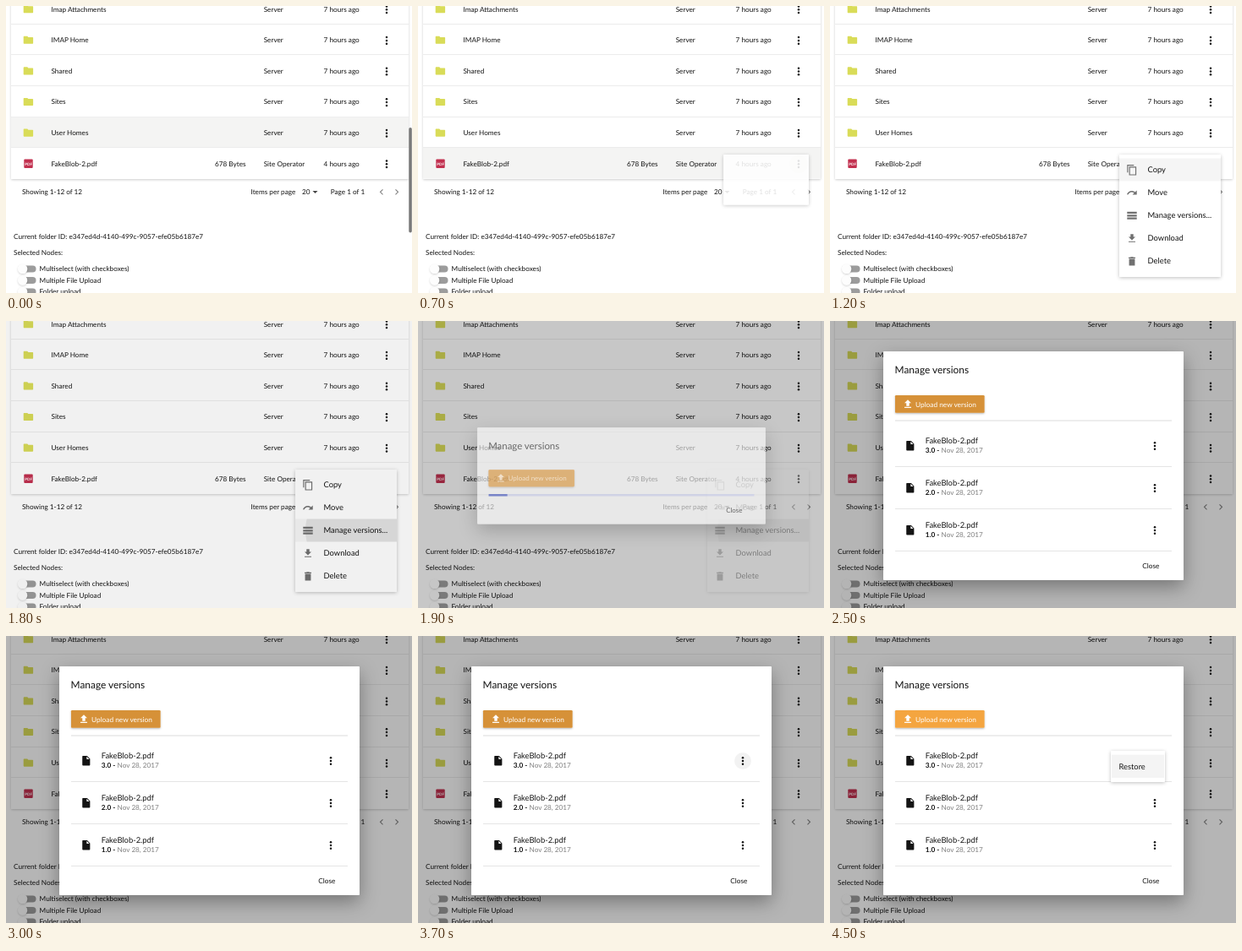
Recreate the animation shown at these times as an HTML page with a canvas. Size 480 by 340 pixels, loop 4.8 s.

```html
<!DOCTYPE html>
<html lang="en">
<head>
<meta charset="utf-8">
<title>Manage versions</title>
<style>
  html, body { margin: 0; width: 100%; height: 100%; overflow: hidden; background: #fff; }
  canvas { display: block; width: 480px; height: 340px; }
</style>
</head>
<body>
<canvas id="stage"></canvas>
<script>
const W = 480, H = 340, LOOP = 4800, STEP = 100;
const canvas = document.getElementById('stage');
const ratio = window.devicePixelRatio || 1;
canvas.width = W * ratio;
canvas.height = H * ratio;
const ctx = canvas.getContext('2d');

// Icons on a 24 x 24 grid, filled with the even-odd rule
const ICONS = {
  folder: 'M10 4H3L2 5V19L3 20H21L22 19V7L21 6H12Z',
  file: 'M5 2L4 3V21L5 22H19L20 21V8L14 2ZM13 3.5V9H18.5Z',
  copy: 'M16 1H2V17H4V3H16ZM6 5H21V23H6ZM8 7V21H19V7Z',
  move: 'M18.4 10.6C16.5 9 14.2 8 11.5 8C6.9 8 2.9 11 1.5 15.2L3.9 16C5 12.8 8 10.5 11.5 10.5C13.5 10.5 15.2 11.2 16.6 12.4L13 16H22V7Z',
  versions: 'M2 20H22V16H2ZM2 4V8H22V4ZM2 14H22V10H2Z',
  download: 'M19 9H15V3H9V9H5L12 16ZM5 18V20H19V18Z',
  upload: 'M9 16H15V10H19L12 3L5 10H9ZM5 18V20H19V18Z',
  trash: 'M6 19V21H18V7H6ZM19 4H15.5L14.5 3H9.5L8.5 4H5V6H19Z'
};
for (const name in ICONS) ICONS[name] = new Path2D(ICONS[name]);

const FOLDERS = ['Imap Attachments', 'IMAP Home', 'Shared', 'Sites', 'User Homes'];
const TOGGLES = ['Multiselect (with checkboxes)', 'Multiple File Upload', 'Folder upload'];
const ACTIONS = [['copy', 'Copy'], ['move', 'Move'], ['versions', 'Manage versions...'],
                 ['download', 'Download'], ['trash', 'Delete']];
const ROW = 36.6, INK = '#141414';

const clamp = x => Math.min(1, Math.max(0, x));
const lerp = (a, b, k) => a + (b - a) * k;
const easeOut = x => 1 - (1 - clamp(x)) ** 3;

function group(draw) {
  ctx.save();
  draw();
  ctx.restore();
}

function text(str, x, y, size = 8.2, color = INK, weight = 400) {
  ctx.font = `${weight} ${size}px Lato, sans-serif`;
  ctx.fillStyle = color;
  ctx.fillText(str, x, y);
}

function rect(x, y, w, h, color, radius = 0) {
  ctx.fillStyle = color;
  ctx.beginPath();
  ctx.roundRect(x, y, w, h, radius);
  ctx.fill();
}

function disc(x, y, r, color) {
  ctx.fillStyle = color;
  ctx.beginPath();
  ctx.arc(x, y, r, 0, Math.PI * 2);
  ctx.fill();
}

function polyline(points, color, width) {
  ctx.strokeStyle = color;
  ctx.lineWidth = width;
  ctx.beginPath();
  points.forEach(p => ctx.lineTo(...p));
  ctx.stroke();
}

function icon(name, cx, cy, color, size = 13.7) {
  group(() => {
    ctx.translate(cx - size / 2, cy - size / 2);
    ctx.scale(size / 24, size / 24);
    ctx.fillStyle = color;
    ctx.fill(ICONS[name], 'evenodd');
  });
}

// The shadow is clipped to the outside, so translucent panels stay clean
function raised(x, y, w, h, color, radius, blur, drop, strength) {
  group(() => {
    ctx.beginPath();
    ctx.rect(-W, -H, 3 * W, 3 * H);
    ctx.roundRect(x, y, w, h, radius);
    ctx.clip('evenodd');
    ctx.shadowColor = `rgba(0,0,0,${strength})`;
    ctx.shadowBlur = blur * ratio;
    ctx.shadowOffsetY = drop * ratio;
    rect(x, y, w, h, color, radius);
  });
  rect(x, y, w, h, color, radius);
}

function kebab(x, y) {
  for (let i = -1; i <= 1; i++) disc(x, y + i * 3.8, 1.25, INK);
}

function listRow(i, hovered) {
  const y = 3.3 + i * ROW, base = y + 3.2, isFile = i === FOLDERS.length;
  if (hovered) rect(6, y - 18.3, 470, ROW, '#f4f4f3');
  if (isFile) {
    rect(21.3, y - 4.8, 10.4, 10.6, '#c2304f', 1);
    text('PDF', 22.2, y + 2.2, 4.5, '#fff', 700);
    text('678 Bytes', 247, base);
  } else {
    icon('folder', 26.4, y + .4, '#d9dc58');
    rect(6, Math.floor(y + 17.9), 470, 1, '#ececec');
  }
  text(isFile ? 'FakeBlob-2.pdf' : FOLDERS[i], 53.5, base);
  text(isFile ? 'Site Operator' : 'Server', 304.7, base);
  text(isFile ? '4 hours ago' : '7 hours ago', 375.6, base);
  kebab(450, y + 1);
}

function drawPage(t) {
  rect(0, 0, W, H, '#fff');
  raised(6, -20, 470, 225, '#fff', 1, 3, 1, .2);
  const hovered = t < 300 ? 4 : t < 800 ? 5 : -1;
  for (let i = 0; i <= FOLDERS.length; i++) listRow(i, i === hovered);
  if (t >= 500 && t < 800) disc(450, 187.3, 11, 'rgba(0,0,0,.06)');

  text('Showing 1-12 of 12', 19, 222.8);
  text('Items per page', 289.5, 222.8);
  text('20', 350, 222.8);
  ctx.fillStyle = '#444';
  ctx.fill(new Path2D('M362.5 219H368.5L365.5 222Z'));
  text('Page 1 of 1', 383.7, 222.8);
  polyline([[445.5, 217.3], [442.5, 220.3], [445.5, 223.3]], '#808080', 1.1);
  polyline([[460.5, 217.3], [463.5, 220.3], [460.5, 223.3]], '#808080', 1.1);

  text('Current folder ID: e347ed4d-4140-499c-9057-efe05b6187e7', 9, 275.6);
  text('Selected Nodes:', 9, 295.2);
  TOGGLES.forEach((label, i) => {
    const y = 311.5 + i * 13.5;
    rect(16, y - 4, 19.5, 8, '#9c9c9c', 4);
    raised(14.2, y - 5.5, 11, 11, '#fdfdfd', 5.5, 2.5, 1, .2);
    text(label, 39.6, y + 2.9);
  });

  const bar = 1 - clamp((t - 100) / 400);
  if (bar > 0) rect(476.3, 144, 3.5, 124.5, `rgba(120,120,120,${bar})`, 1.8);
}

// Panel growing out of its top right corner, its items fading in afterwards
function popup(right, top, w, h, age, drawItems) {
  if (age < 0) return;
  const k = clamp(age / 100), pw = w * lerp(.84, 1, k), ph = h * lerp(.41, 1, k);
  const base = ctx.globalAlpha;
  ctx.globalAlpha = base * lerp(.87, 1, k);
  raised(right - pw, top, pw, ph, '#fff', 1, 4, 1, .25);
  ctx.globalAlpha = base * clamp((age - 100) / 300);
  drawItems(right - w, top);
  ctx.globalAlpha = base;
}

function drawActionMenu(t) {
  const fade = t < 1900 ? 1 : .4 * clamp((2000 - t) / 100);
  if (fade === 0) return;
  group(() => {
    ctx.globalAlpha = fade;
    popup(462, 176, 120, 145, t - 700, (x, y) => {
      const active = t < 1400 ? 0 : t < 1500 ? 1 : 2;
      const middle = i => y + 18 + i * 27;
      rect(x, middle(active) - 13.5, 120, 27, '#f5f5f5');
      if (t >= 1700) group(() => {
        ctx.beginPath();
        ctx.rect(x, middle(2) - 13.5, 120, 27);
        ctx.clip();
        disc(410, 248, lerp(20, 56, clamp((t - 1700) / 100)), 'rgba(0,0,0,.08)');
      });
      ACTIONS.forEach(([name, label], i) => {
        icon(name, x + 15, middle(i) + .3, '#707070');
        text(label, x + 33.5, middle(i) + 3.2, 9.4);
      });
    });
  });
}

function versionRow(i) {
  const y = 148 + i * 50;
  icon('file', 94.8, y - .3, INK);
  text('FakeBlob-2.pdf', 112.8, y - 2.8, 9.4);
  text(`${3 - i}.0 - `, 112.8, y + 8, 8.2, INK, 700);
  text('Nov 28, 2017', 131.6, y + 8, 8.2, '#808080');
  kebab(384, y);
  rect(77, y + 24.2, 327, .8, '#dcdcdc');
}

function drawDialog(t) {
  if (t < 1900) return;
  const p = easeOut((t - 1795) / 400), loaded = t >= 2200;
  const h = loaded ? 271 : 119, scale = lerp(.9, 1, p);
  group(() => {
    ctx.globalAlpha = p;
    ctx.translate(240.5, 171.5 + .25 * h * (1 - p));
    ctx.scale(scale, scale);
    // Contents are laid out from a top edge at y = 36
    ctx.translate(-240.5, -h / 2 - 36);
    raised(63, 36, 355, h, '#fff', 1, 22, 8, .35);
    text('Manage versions', 76.6, 62.3, 11.9);

    const focus = .12 * (1 - clamp((t - 3700) / 300));
    raised(77, 88, 105.5, 20.8, '#f4a540', 1.2, 2.5, 1, .3);
    rect(77, 88, 105.5, 20.8, `rgba(0,0,0,${focus})`, 1.2);
    icon('upload', 92, 98.4, '#fff');
    text('Upload new version', 101, 101.5, 8.3, '#fff');

    if (loaded) {
      rect(77, 117.6, 327, .8, '#dcdcdc');
      for (let i = 0; i < 3; i++) versionRow(i);
    } else {
      rect(77, 118, 327, 2.6, '#c5cae9');
      rect(77, 118, 23 + (t - 1900) * .25, 2.6, '#3f51b5');
    }
    text('Close', 369.3, 36 + h - 14, 8.3);
  });
  if (t >= 3700) {
    disc(384, 148, 10, 'rgba(0,0,0,.05)');
    popup(396, 136, 64, 37, t - 3800, (x, y) => {
      rect(x + 1, y + 4.8, 62, 27.2, '#f4f4f4');
      text('Restore', x + 9.4, y + 21.6, 9.4);
    });
  }
}

function render(now) {
  const t = Math.floor((now % LOOP) / STEP) * STEP;
  ctx.setTransform(ratio, 0, 0, ratio, 0, 0);
  ctx.textRendering = 'geometricPrecision';
  drawPage(t);
  drawActionMenu(t);
  const dim = .29 * easeOut((t - 1777) / 330);
  rect(0, 0, W, H, `rgba(0,0,0,${dim})`);
  drawDialog(t);
}

const start = performance.now();
function tick() {
  render(performance.now() - start);
  requestAnimationFrame(tick);
}
tick();
</script>
</body>
</html>
```
